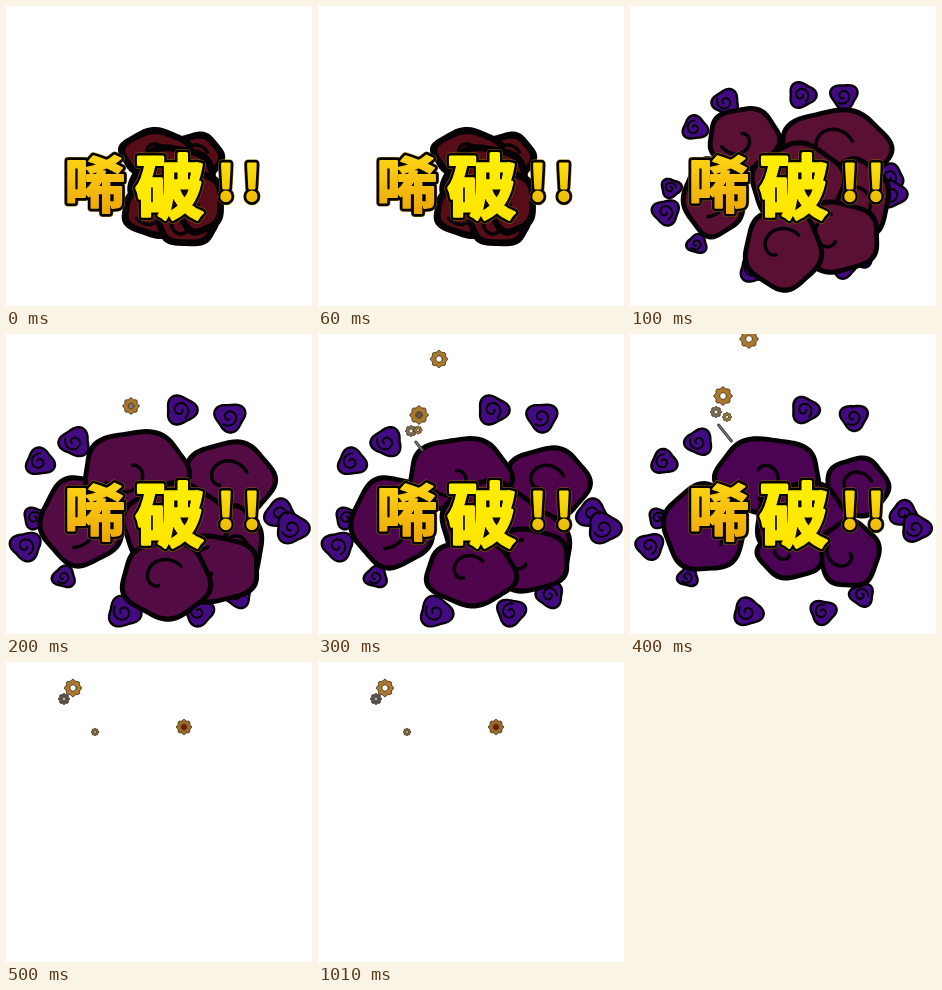
Write an HTML page with a canvas that moves like this. It is 306 px wide and 300 px high and loops after 1.35 s.

```html
<!DOCTYPE html>
<html lang="zh">
<head>
<meta charset="utf-8">
<title>Purple burst</title>
<style>
  html, body { margin: 0; width: 100%; height: 100%; overflow: hidden; background: #fff; }
  canvas { display: block; }
</style>
</head>
<body>
<canvas id="stage" width="306" height="300"></canvas>
<script>
const ctx = document.getElementById('stage').getContext('2d');
const STEP = 100, LOOP = 1350;
const INK = '#050104';

// Big cloud lobes per pose, back to front: x, y, rx, ry
const lobes = [
  [[190,151,28,25], [150,147,37,25], [168,180,45,42], [150,205,35,27], [181,220,31,21], [193,196,26,33]],
  [[205,143,57,41], [225,194,36,42], [84,191,32,41], [114,132,37,32], [168,178,48,42], [207,231,44,37], [153,243,40,42]],
  [[223,146,47,40], [230,212,28,41], [76,187,43,46], [130,137,54,42], [170,193,55,45], [208,235,47,35], [160,246,46,40]],
  [[229,149,44,37], [227,216,27,38], [75,188,43,47], [142,142,53,40], [172,191,50,45], [210,226,43,33], [153,239,47,34]],
  [[227,153,33,31], [75,194,43,45], [138,141,54,39], [172,188,48,42], [219,220,32,35], [161,218,35,28]]
];
const tints = ['#560d18', '#5a1033', '#520b43', '#4f054b', '#4b0453'];

// Small puffs: first place x, y, then resting place x, y and radius
const puffs = [
  [172,89, 175,76,16], [214,90, 224,83,16], [96,96, 69,108,16],
  [65,122, 34,128,15], [41,182, 29,184,12], [36,206, 20,212,16],
  [67,238, 58,243,12], [124,263, 118,278,17], [214,260, 193,278,15],
  [232,250, 232,261,14], [260,171, 274,180,16], [262,188, 286,194,17]
];
const puffSize = [0, .88, 1, 1, .9];

// Loose parts per pose: x, y, radius, colour, hole colour
const GOLD = '#a97932', DULL = '#77705f';
const gears = [
  [], [],
  [[125,72,8,GOLD,'#777']],
  [[121,25,8.5,GOLD,'#fff'], [101,81,9,GOLD,'#654'], [93,97,5.5,DULL,'#eee'], [100,96,4,'#968044','#ddd']],
  [[119,5,9,GOLD,'#fff'], [93,62,9,GOLD,'#fff'], [86,78,5.5,DULL,'#eee'], [97,83,4.5,'#968044','#ddd']],
  [[67,26,8.5,GOLD,'#fff'], [58,37,5.5,'#555559','#aaa'], [89,70,3.7,'#777044','#ddd'], [178,65,7.5,'#9b692c','#711c0c']]
];
const pins = { 3: [101,112,4], 4: [95,99,8] };

// Closed curve whose radius ripples n times around the centre
function blob(x, y, rx, ry, n, depth, phase) {
  ctx.beginPath();
  for (let i = 0; i < 72; i++) {
    const a = i * Math.PI / 36, k = 1 + depth * Math.cos(n * a + phase);
    ctx.lineTo(x + rx * k * Math.cos(a), y + ry * k * Math.sin(a));
  }
  ctx.closePath();
}

function paint(color) {
  ctx.fillStyle = color;
  ctx.fill();
}

function line(color, width) {
  ctx.strokeStyle = color;
  ctx.lineWidth = width;
  ctx.stroke();
}

function swirl(x, y, r, start, turns, width) {
  ctx.beginPath();
  for (let i = 0; i <= 30; i++) {
    const u = i / 30, a = start + u * turns * Math.PI * 2, d = r * (.25 + .75 * u);
    ctx.lineTo(x + d * Math.cos(a), y + d * Math.sin(a));
  }
  line(INK, width);
}

function drawPuff([x1, y1, x2, y2, r], i, pose) {
  const x = pose === 1 ? x1 : x2, y = pose === 1 ? y1 : y2;
  const s = r * puffSize[pose];
  blob(x, y, s * .92, s * .86, 3, .13, i * 1.7);
  paint('#430b82');
  line(INK, 2.4);
  swirl(x - 1, y, s * .58, i * 1.3, 1.15, 2);
}

function drawCloud(pose) {
  lobes[pose].forEach(([x, y, rx, ry], i) => {
    const edge = pose ? 5 : 7;
    blob(x, y, rx, ry, 5, .045, i * 1.9);
    paint(INK);
    blob(x, y, rx - edge, ry - edge, 5, .045, i * 1.9);
    paint(tints[pose]);
    swirl(x - rx * .12, y, Math.min(rx, ry) * .62, 2.2 + i, .6, 3.5);
  });
}

function drawGear([x, y, r, color, hole]) {
  blob(x, y, r * .93, r * .93, 8, .09, 0);
  paint(color);
  line('#493315', 1);
  blob(x, y, r * .36, r * .36, 1, 0, 0);
  paint(hole);
  line('#493315', 1);
}

function drawPin([x, y, r]) {
  ctx.beginPath();
  ctx.moveTo(x - r * .8, y - r);
  ctx.lineTo(x + r * .8, y + r);
  line('#444', 3);
  line('#8b8b85', 1);
}

function letter(text, x, y, size, top, bottom, fat) {
  ctx.font = `700 ${size}px "Noto Sans CJK TC", "Noto Sans CJK SC", "Noto Sans CJK JP", "Noto Sans CJK", sans-serif`;
  const fill = ctx.createLinearGradient(0, y - size, 0, y);
  fill.addColorStop(0, top);
  fill.addColorStop(1, bottom);
  const outline = (color, width) => {
    ctx.strokeStyle = color;
    ctx.lineWidth = width;
    ctx.strokeText(text, x, y);
  };
  outline('#8a6a08', fat + 6);
  outline(INK, fat + 5);
  outline(fill, fat);
  ctx.fillStyle = fill;
  ctx.fillText(text, x, y);
}

function drawTitle() {
  letter('唏', 89, 202, 61, '#ffdc18', '#edab08', 1.8);
  letter('破', 164, 207, 69, '#fff000', '#ffe600', 3.2);
  for (const x of [220, 246]) letter('!', x, 194, 48, '#ffea08', '#eebe08', 2.5);
}

function draw(now) {
  const pose = Math.min(5, Math.floor(now % LOOP / STEP));
  ctx.fillStyle = '#fff';
  ctx.fillRect(0, 0, 306, 300);
  if (pose < 5) {
    if (pose) puffs.forEach((p, i) => drawPuff(p, i, pose));
    drawCloud(pose);
    drawTitle();
  }
  gears[pose].forEach(drawGear);
  if (pins[pose]) drawPin(pins[pose]);
  requestAnimationFrame(draw);
}

ctx.textAlign = 'center';
ctx.lineJoin = ctx.lineCap = 'round';
draw(0);
</script>
</body>
</html>
```
